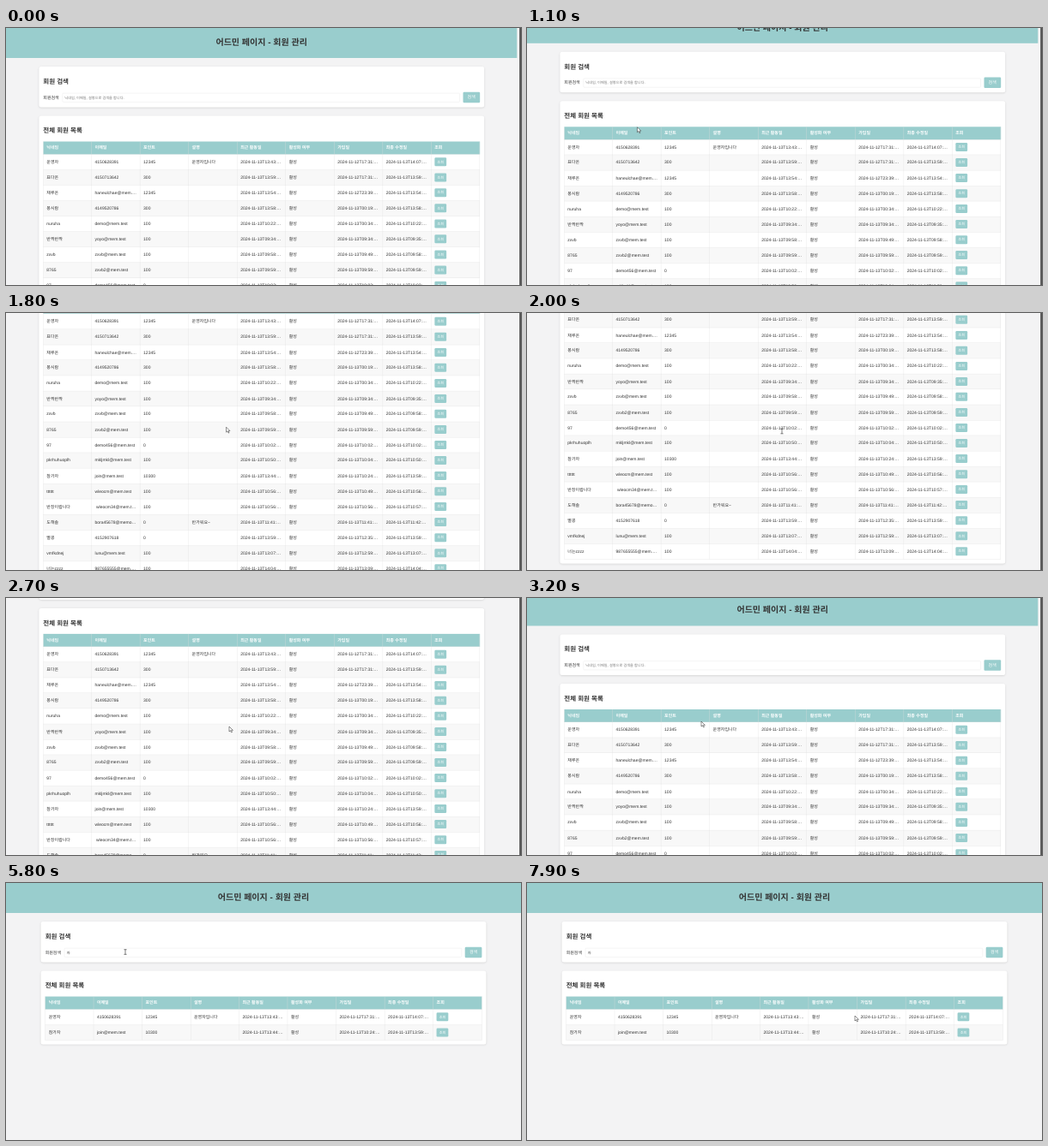
Animation of 600 by 300 pixels, one loop 8000 ms. Source, as an HTML page:

```html
<!DOCTYPE html>
<html lang="ko">
<head>
<meta charset="utf-8">
<style>
html, body { margin: 0; width: 600px; height: 300px; overflow: hidden; }
#stage { position: relative; width: 1920px; height: 960px; overflow: hidden; background: #f3f3f4; color: #333;
  transform: scale(.3125); transform-origin: 0 0; text-rendering: geometricPrecision;
  font: 16px "Liberation Sans", "Noto Sans CJK KR", sans-serif; }
#page { position: absolute; width: 1905px; }
.found #page { width: 1920px; }
header { height: 112px; background: #99cdcd; font: bold 32px/104px "Liberation Sans", "Noto Sans CJK KR", sans-serif; text-align: center; }
section { position: relative; box-sizing: border-box; width: 1660px; margin: 32px auto 0; padding: 40px 16px 16px;
  background: #fff; border-radius: 8px; box-shadow: 0 2px 8px #0002; }
h2 { margin: 0 0 24px; font-size: 24px; line-height: 32px; }
.search { height: 152px; }
.search > * { position: absolute; }
label { top: 96px; line-height: 40px; }
.input { left: 87px; top: 99px; width: 1480px; height: 32px; border: 1px solid #ddd; border-radius: 4px;
  font-size: 13.33px; line-height: 32px; text-indent: 8px; }
.input.empty { color: #757575; }
#caret { position: absolute; left: 7px; top: 7px; width: 2px; height: 18px; background: #000; }
.button { background: #99cdcd; color: #fff; border-radius: 4px; text-align: center; }
.search .button { right: 16px; top: 95px; width: 63px; height: 40px; line-height: 40px; }
.row { display: grid; grid-template-columns: repeat(9, 1fr); height: 57.7px; line-height: 57px; }
.row:nth-child(even) { background: #f8f8f8; }
.row.head { height: 48px; line-height: 48px; background: #99cdcd; color: #fff; font-weight: bold; }
.row > div { box-sizing: border-box; padding: 0 12px; border: solid #ddd; border-width: 0 1px 1px 0;
  overflow: hidden; white-space: nowrap; text-overflow: ellipsis; }
.row > div:first-child { border-left-width: 1px; }
.row .button { width: 44px; height: 32px; margin-top: 12px; font-size: 13.33px; line-height: 32px; }
#bar { position: absolute; right: 0; width: 6px; height: 960px; background: #555; }
.found #bar { display: none; }
svg { position: absolute; left: 0; top: 0; overflow: visible; }
</style>
</head>
<body>
<div id="stage">
  <div id="page">
    <header>어드민 페이지 - 회원 관리</header>
    <section class="search">
      <h2>회원 검색</h2>
      <label>회원검색</label>
      <div class="input"><span id="query"></span><i id="caret"></i></div>
      <div class="button">검색</div>
    </section>
    <section>
      <h2>전체 회원 목록</h2>
      <div class="row head" id="head"></div>
      <div id="rows"></div>
    </section>
  </div>
  <div id="bar"></div>
  <svg id="mouse" width="1" height="1">
    <path id="arrow" d="M0 0V19L4.500 15L8 22L11 21L8 14H14Z" fill="#fff" stroke="#222" stroke-width="1.600"/>
    <path id="beam" d="M-5 -9H5M0 -9V9M-5 9H5" fill="none" stroke="#333" stroke-width="2"/>
  </svg>
</div>
<script>
const $ = id => document.getElementById(id);
const LOOP = 8000;

// name | id or mail | points | description | active | joined | edited (day and time in November)
const members = `운영자|4150628391|${12_345}|운영자입니다|13T13:43|12T17:31|13T14:07
표다온|4150713642|300||13T13:59|12T17:31|13T13:59
채루온|haneulchae@mem.test|${12_345}||13T13:54|12T23:39|13T13:54
봉시람|4149520786|300||13T13:58|13T00:19|13T13:58
nuruha|demo@mem.test|100||13T10:22|13T00:34|13T10:22
반짝반짝|yoyo@mem.test|100||13T09:34|13T09:34|13T09:35
zxvb|zxvb@mem.test|100||13T09:58|13T09:49|13T09:58
8765|zxvb2@mem.test|100||13T09:59|13T09:59|13T09:59
97|demo456@mem.test|0||13T10:02|13T10:02|13T10:02
pkrhuhuoplh|mkljmkl@mem.test|100||13T10:50|13T10:04|13T10:50
참가자|join@mem.test|10300||13T13:44|13T10:24|13T13:59
tttttt|wleocm@mem.test|100||13T10:56|13T10:49|13T10:56
반장이랍니다|&nbsp;wleocm34@mem.test|100||13T10:56|13T10:56|13T10:57
도해솔|bora45678@memo.test|0|반가워요~|13T11:41|13T11:41|13T11:42
별콩|4152907618|0||13T13:59|13T12:35|13T13:59
vmfkdnej|lunu@mem.test|100||13T13:07|13T12:59|13T13:07
너는zzzz|987655555@mem.test|100||13T14:04|13T13:09|13T14:04`.split('\n').map(line => line.split('|'));

const cells = list => list.map(text => `<div>${text}</div>`).join('');
const stamp = time => `2024-11-${time}:27.514`;
const row = ([name, mail, points, note, active, joined, edited]) => `<div class="row">${cells([
  name, mail, points, note, stamp(active), '활성', stamp(joined), stamp(edited), '<div class="button">조회</div>'])}</div>`;

// points are [time, ...values], joined by straight lines
function along(points, t) {
  const i = points.findIndex(p => p[0] > t);
  if (i === 0) return points[0].slice(1);
  if (i < 0) return points.at(-1).slice(1);
  const [a, b] = [points[i - 1], points[i]];
  const k = (t - a[0]) / (b[0] - a[0]);
  return a.slice(1).map((v, j) => v + (b[j + 1] - v) * k);
}

const scroll = [[1000, 0], [1500, 86.5], [1900, 166.5], [2350, 166.5], [2700, 90.5], [3200, 2.5], [3300, 0]];
const pointer = [[200, 33, 89], [400, 44, 103], [600, 44, 103], [1500, 196, 126], [2000, 297, 138], [2300, 297, 140],
  [2700, 260, 150], [3200, 203, 144], [3700, 136, 80.5], [3900, 136, 80.5], [4000, 139, 80.5], [7100, 139, 80.5],
  [7200, 130, 81], [7400, 170, 95], [7900, 382, 155]];

const within = (t, from, to) => t >= from && t < to;
const show = (id, on) => $(id).style.display = on ? '' : 'none';
let shownFilter;

function draw(t) {
  const query = t < 4600 ? '' : t < 5000 ? 'ㅈ' : '자';
  const filter = t < 5700 ? '' : query;
  if (filter !== shownFilter) {
    shownFilter = filter;
    $('rows').innerHTML = members.filter(m => m[0].includes(filter)).map(row).join('');
    $('stage').className = filter && 'found';
  }
  $('page').style.top = -along(scroll, t)[0] * 3.2 + 'px';
  $('query').textContent = query || '닉네임, 이메일, 설명으로 검색을 합니다.';
  $('query').parentNode.className = query ? 'input' : 'input empty';
  show('caret', within(t, 4200, 4700));

  const [x, y] = along(pointer, t);
  const overText = within(t, 1900, 2400) || within(t, 3600, 7300);
  $('mouse').style.transform = `translate(${x * 3.2}px, ${y * 3.2}px)`;
  show('mouse', t >= 200);
  show('arrow', !overText);
  show('beam', overText);
}

function tick(now) {
  draw(Math.floor(now % LOOP / 100) * 100);
  requestAnimationFrame(tick);
}

$('head').innerHTML = cells(['닉네임', '이메일', '포인트', '설명', '최근 활동일', '활성화 여부', '가입일', '최종 수정일', '조회']);
draw(0);
requestAnimationFrame(tick);
</script>
</body>
</html>
```
